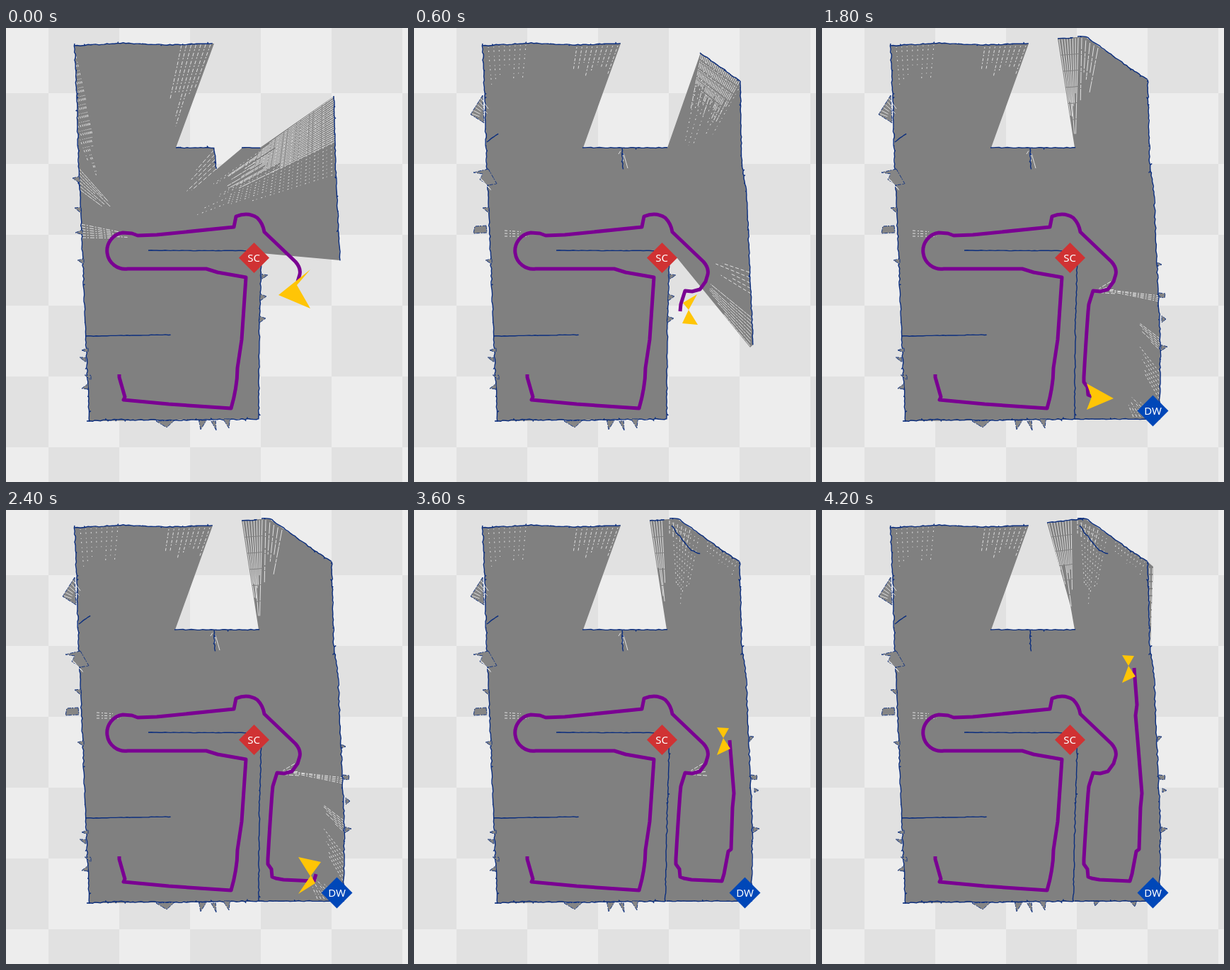
An HTML page that plays this animation: 568 by 641 pixels, repeating every 4800 ms.

```html
<!DOCTYPE html>
<html lang="en">
<head>
<meta charset="utf-8">
<title>Robot mapping</title>
<style>
html, body { margin: 0; width: 100%; height: 100%; overflow: hidden; background: #ededed; }
svg { display: block; width: 568px; height: 641px; }
text { font: 15px "Noto Sans", "Open Sans", sans-serif; fill: #fff; text-anchor: middle; }
.free { fill: #808080; }
.ray { fill: none; stroke: #ececec; stroke-width: .9; }
.wall { fill: none; stroke: #0a2d7d; stroke-width: 1.4; }
.spike { fill: #858585; stroke: #0a2d7d; stroke-width: .9; stroke-dasharray: 5 2 2 1; }
.trail { fill: none; stroke: #7a0092; stroke-width: 5; stroke-linejoin: round; }
.robot { fill: #ffc506; }
</style>
</head>
<body>
<svg viewBox="0 0 568 641">
  <g id="floor"></g>
  <g id="map"></g>
  <path id="trail" class="trail"/>
  <path id="robot" class="robot"/>
  <g transform="translate(350.5 324.5)"><path d="M0-21.5L21.5 0L0 21.5L-21.5 0z" fill="#d03233"/><text x="-.5" y="5.5">SC</text></g>
  <g id="dw"><path d="M0-22L22 0L0 22L-22 0z" fill="#0047b8"/><text y="5.5">DW</text></g>
</svg>
<script>
(() => {
const $ = id => document.getElementById(id);
let seed = 1;
const rnd = () => (seed = seed * 16807 % 2147483647) / 2147483647;
const jitter = r => (rnd() * 2 - 1) * r;
const mix = (a, b, k) => a + (b - a) * k;
const pairs = s => s.match(/\S+ \S+/g).map(p => p.split(' ').map(Number));
const reverse = s => pairs(s).reverse().join(' ').replace(/,/g, ' ');
const at = (x, y) => `${x.toFixed(1)} ${y.toFixed(1)}`;

const free = pts => `<path class="free" d="M${pts}Z"/>`;
const spike = d => `<path class="spike" d="${d}"/>`;

// Rough scanned wall through the given points
function wall(points, rough = .7) {
  const p = pairs(points);
  let d = 'M' + p[0].join(' '), specks = '';
  for (let i = 1; i < p.length; i++) {
    const [[x0, y0], [x1, y1]] = [p[i - 1], p[i]];
    const steps = Math.ceil(Math.hypot(x1 - x0, y1 - y0) / 4);
    for (let j = 1; j <= steps; j++) {
      const spot = at(mix(x0, x1, j / steps) + jitter(rough), mix(y0, y1, j / steps) + jitter(rough));
      d += 'L' + spot;
      if (rnd() < .18 * rough) specks += `M${spot}l${at(jitter(2.5), jitter(2.5))}`;
    }
  }
  return `<path class="wall" d="${d}${specks}"/>`;
}

// Unscanned gaps: n rays from an edge towards (ox, oy)
function fan(ox, oy, edge, n, reach, dash = '7 2 3 1') {
  const [[px, py], [qx, qy]] = pairs(edge);
  let d = '';
  for (let i = 0; i < n; i++) {
    const k = i / (n - 1), r = reach * (.45 + .55 * rnd());
    const x = mix(px, qx, k), y = mix(py, qy, k);
    d += `M${at(x, y)}L${at(mix(x, ox, r), mix(y, oy, r))}`;
  }
  return `<path class="ray" stroke-dasharray="${dash}" d="${d}"/>`;
}

// Small triangles with given tips, standing on a wall at offset (dx, dy)
const teeth = (dx, dy, tips) => spike(pairs(tips).map(([x, y]) => {
  const w = 4 + jitter(1.5), s = jitter(4);
  const bx = x + dx + (dy ? s : 0), by = y + dy + (dx ? s : 0);
  return `M${x} ${y}L${dy ? at(bx - w, by) : at(bx, by - w)}L${dy ? at(bx + w, by) : at(bx, by + w)}Z`;
}).join(''));

const dots = '1 4 2 6';
const leftEdge = '97 22 100 100 103 200 107 290 110 370 113 440 118 555';
const topEdge = '97 25 165 21.5 228 24 292 22';
const eastEdge = '460 73 463 190 469 235 478 440 477 552';
const innerEdge = '361 318 358 420 357 552';
const closing = reverse(leftEdge);

const rooms = wall(leftEdge, .9) + wall(topEdge) + wall('114 555 160 553 240 554 357 552', .9) +
  wall('201 314 340 314.5', .35) + wall('112 435 233 433', .4) +
  teeth(9, 0, '97 254 101 328 107 455 104 465 111 490 107 509') +
  spike('M212 555L227 564L238 554Z') + teeth(0, -13, '275 567 297 568 315 565');

const northWest = fan(130, 310, '105 27 158 24', 8, .2, dots) +
  fan(190, 300, '230 27 288 25', 9, .16, '2 3 4 2') + fan(240, 294, '128 286 128 294', 3, .35, '4 3 2 2');

const nooks = spike('M97 95L80 122L99 134ZM105 199L84 204L97 206L93 214L104 222L117 220ZM102 279L86 280L84 290L103 289Z') +
  fan(120, 135, '95 100 82 121', 6, .5, '9 0') + fan(115, 235, '87 204 97 217', 4, .8, '5 2') +
  wall('103 161 119 149', .4) + wall('294 170 295 199') + wall('238 169 358 169', .5);

const innerWall = wall(innerEdge);
const innerTeeth = teeth(-9, 0, '370 349 368 379 367 410');
const stub = fan(294, 170, '289 178 302 198', 3, .9, '9 0');
const eastWall = wall(eastEdge, .9) + wall('357 552 477 552', .6) + wall('361 12 373 12 430 53 460 73') +
  spike('M476 374L485 375L484 381L477 380Z') + teeth(-9, 0, '488 450');

function mapStart() {
  return free(`${topEdge} 294 22 240 169 294 169 297 200 334 169 359 169 464 96 466 208 472 328 ${innerEdge} ${closing}`) +
    fan(185, 296, '464 97 465 160', 22, .55, '14 1 6 1') + fan(185, 296, '464 100 466 206', 20, .7, dots) +
    fan(190, 300, '248 24 289 23', 7, .42, '5 2 2 3') + fan(155, 295, '99 40 102 150', 10, .52, '3 5 1 3') +
    fan(180, 285, '101 196 104 228', 7, .6, '8 1 4 1') + fan(185, 296, '294 172 297 199', 5, .45, '6 3') +
    fan(205, 297, '106 277 107 296', 6, .75, '6 2 2 2') + rooms + innerWall + innerTeeth +
    wall('240 169 294 169 297 199') + wall('333 169 359 169', .4) + wall('463 96 466 208 472 328') +
    teeth(10, 0, '94 212 98 289');
}

function mapCorner() {
  return free(`${topEdge} 239 169 358 169 405 35 461 75 463 190 470 235 479 447 475 451 372 325 ${innerEdge} ${closing}`) +
    northWest + fan(365, 250, '406 37 460 75', 24, .36, '7 2 2 1') + fan(365, 250, '408 38 461 82', 10, .6, dots) +
    fan(366, 318, '475 449 478 410', 9, .55, '10 1 4 1') + fan(370, 310, '474 345 476 375', 5, .5, '5 3') +
    stub + rooms + innerWall + innerTeeth + nooks + wall('404 35 461 75') + wall('461 75 463 190 470 235 479 447');
}

// East side explored; gap is the right rim of the notch, rays and details vary
const mapEast = (gap, ...details) => free(`${topEdge} 239 169 ${gap} 371 12 ${eastEdge} ${closing}`) +
  northWest + details.join('') + rooms + nooks + eastWall;

const crumbs = fan(383, 373, '408 358 414 375', 4, .8, '6 2');
const refined = fan(362, 150, '361 15 390 28', 6, .25, '5 2') + fan(375, 170, '365 18 402 40', 8, .75, dots) +
  fan(410, 200, '415 45 456 73', 10, .15, dots) + wall('364 22 389 55 404 62', .8) +
  wall('361 318 358 420 355 552') + teeth(-6, 0, '480 320 487 396');

const maps = [
  mapStart(),
  mapCorner(),
  mapEast('357 169 333 15', stub, crumbs, innerWall,
    fan(358, 168, '335 16 362 14', 8, .95, '22 1') + fan(364, 165, '367 14 390 28', 5, .6, '16 2 5 1') +
    fan(388, 368, '477 378 476 386', 4, .9, '5 2 2 2') + fan(390, 372, '478 439 481 458', 6, .34, '6 2') +
    fan(395, 380, '476 485 476 523', 7, .33, '3 3') + fan(422, 505, '440 549 474 549', 8, .65, '4 3 1 2'),
    wall('333 15 354 14'), teeth(-6, 0, '480 334 486 411')),
  mapEast('357 169 333 15', stub, crumbs, refined, fan(358, 168, '335 16 350 15', 5, .95, '22 1'), wall('333 15 354 14')),
  mapEast('357 169 351 135 318 18', refined, fan(354, 150, '320 18 352 14', 9, .92, '20 1'), wall('318 18 371 12'),
    free('460 73 468 80 464 195'), fan(464, 195, '463 82 467 82', 2, .9, '8 2'), teeth(0, -7, '386 559 442 560'))
];

// The stretch of trail driven in each step
const legs = [
  'M160 489V493L168 521L166 525L230 531L318 537Q327 506 327 480L333 440L339 352L299 345L283 340H172' +
    'A25.5 25.5 0 0 1 165 289L178 290L186 293L213 292L322 281L325 266Q342 259 355 268Q363 276 365 288L409 330Q417 339 415 348L412 358',
  'L404 369L393 372L383 371L377 390L376 400',
  'Q373 440 370 493',
  'V500L375 507L376 518L381 520',
  'L392 522L435 524L438 514',
  'L444 482L448 479L450 420',
  'L452 400L446 325',
  'L443 290L445 275L441 223'
];

// Robot seen edge-on while it turns, and flat while it drives
const glass = 'm-9-15l17 1l-8 14l10 15l-19 9l9-24z';
const glassTilted = 'm-8-10l20-12l-12 22l13 21l-22-2l9-19z';
const poses = [
  'M411 363l19-22l-45 36l45 19z',
  'M388 398' + glassTilted,
  'M379 492' + glassTilted,
  'M381 521l-7-19l38 21l-38 16z',
  'M431 517m-18-27l32 7l-14 19l6 11l-24 15l17-25z',
  'M439 417' + glass,
  'M437 322' + glass,
  'M433 220' + glass
];

let tiles = '';
for (let r = 0; r < 7; r++)
  for (let c = 0; c < 7; c++)
    tiles += `<rect x="${c * 100 - 40}" y="${r * 100 - 8}" width="100" height="100" fill="${(r + c) % 2 ? '#e1e1e1' : '#ededed'}"/>`;
$('floor').innerHTML = tiles;

const mapAt = [0, 1, 1, 2, 2, 3, 3, 4];
let shown = -1;
function draw(ms) {
  const i = Math.floor(ms % 4800 / 600);
  if (i === shown) return;
  shown = i;
  $('map').innerHTML = maps[mapAt[i]];
  $('trail').setAttribute('d', legs.slice(0, i + 1).join(''));
  $('robot').setAttribute('d', poses[i]);
  $('dw').style.display = i < 2 ? 'none' : '';
  $('dw').setAttribute('transform', i > 2 ? 'translate(467.5 540.5)' : 'translate(365.5 555)');
}
function tick() {
  draw(performance.now());
  requestAnimationFrame(tick);
}
tick();
})();
</script>
</body>
</html>
```
